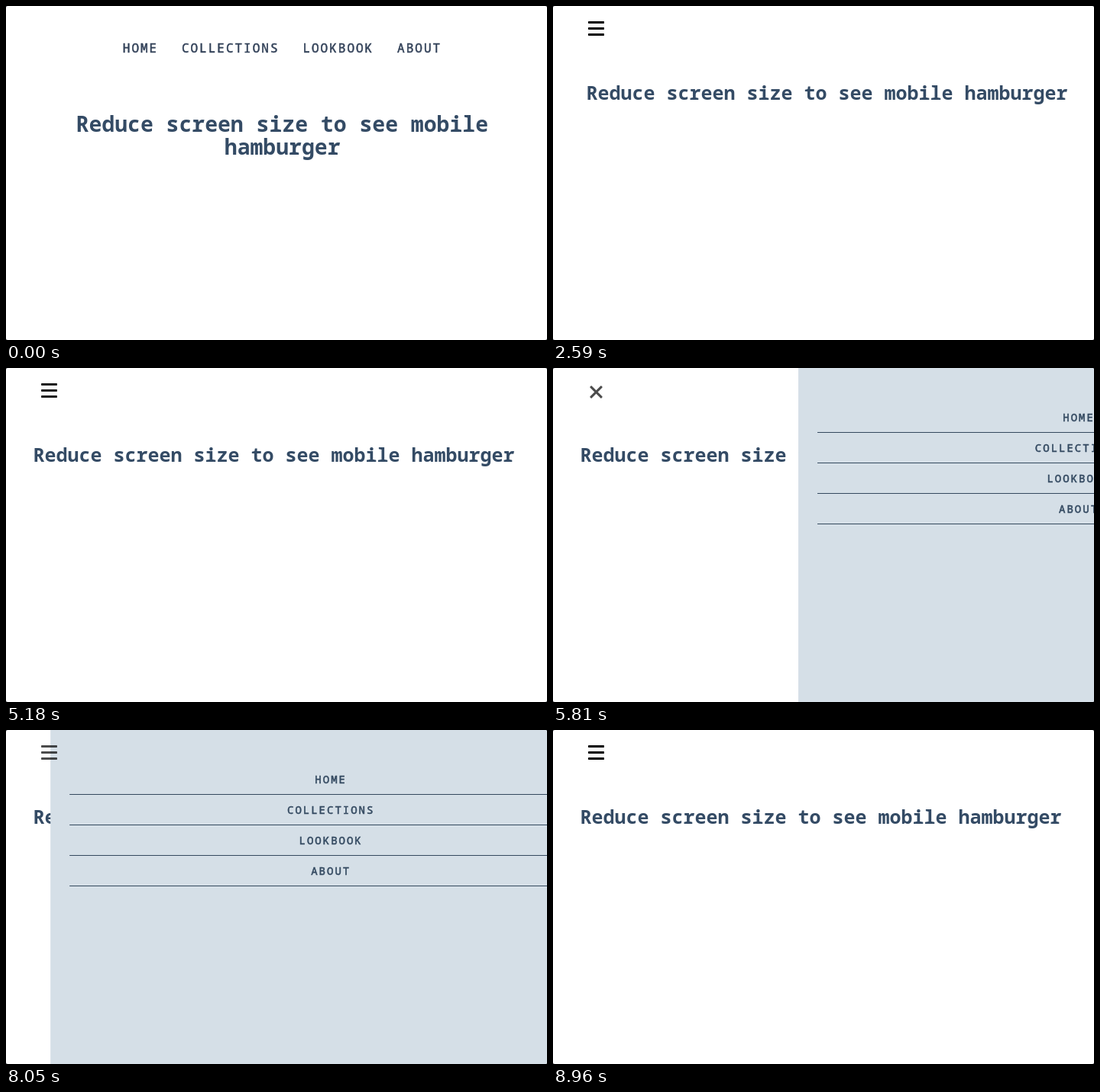
These frames come from a looping animation (708 px wide and 438 px high, 9870 ms). An HTML page:

```html
<!DOCTYPE html>
<html lang="en">
<head>
<meta charset="utf-8">
<title>Mobile menu</title>
<style>
  html, body { margin: 0; width: 100%; height: 100%; overflow: hidden; background: #4a4f55; }
  svg { display: block; width: 708px; height: 438px; background: #fff; border-radius: 2.5px; }
  text { font-family: 'Roboto Mono', 'Noto Sans Mono', monospace; fill: #344b65; white-space: pre; }
  .title { font-weight: 700; }
  .wide .title { font-size: 28.1px; }
  #narrow { font-size: 25px; }
  /* The thin stroke gives a medium weight */
  .link { font-weight: 500; letter-spacing: 2px; stroke: #34495e; stroke-width: .55px; }
  .wide .link { font-size: 16px; fill: #34435a; stroke: #34435a; }
  #panel .link { font-size: 14px; }
  #panel path { stroke: #34495e; stroke-width: 1; }
</style>
</head>
<body>
<svg viewBox="0 0 708 438">
  <g id="wide" class="wide">
    <text class="title" x="91.6" y="165">Reduce screen size to see mobile</text>
    <text class="title" x="285.8" y="195">hamburger</text>
  </g>
  <text id="narrow" class="title" y="123">Reduce screen size to see mobile hamburger</text>
  <g id="panel"><rect width="760" height="438" fill="#d5dfe7"/></g>
  <g id="icon">
    <rect x="-10.5" y="-1.5" width="21" height="3" rx=".8"/>
    <rect x="-10.5" y="-1.5" width="21" height="3" rx=".8"/>
    <rect x="-10.5" y="-1.5" width="21" height="3" rx=".8"/>
  </g>
</svg>
<script>
const LOOP = 9870, STEP = 70, LAST = 8960;
const NARROW_AT = 2590;
const links = ['HOME', 'COLLECTIONS', 'LOOKBOOK', 'ABOUT'];
const wideX = [152.8, 229.9, 388.4, 512.1];
// Resize bursts: [first step, number of steps]
const nudges = [[2660, 4], [3010, 5], [3640, 3], [4130, 2]];

const $ = id => document.getElementById(id);
const wide = $('wide'), narrow = $('narrow'), panel = $('panel'), icon = $('icon');
const [upper, middle, lower] = icon.children;

function add(parent, tag, attrs, text = '') {
  const el = document.createElementNS('http://www.w3.org/2000/svg', tag);
  for (const name in attrs) el.setAttribute(name, attrs[name]);
  el.textContent = text;
  parent.append(el);
}

links.forEach((label, i) => {
  const y = 70 + 40 * i;
  add(wide, 'text', { class: 'link', x: wideX[i], y: 61 }, label);
  add(panel, 'text', { class: 'link', x: 367 - label.length * 5.2, y }, label);
  add(panel, 'path', { d: `M25 ${y + 14.5}H708` });
});

const ramp = (t, start, length) => Math.min(1, Math.max(0, (t - start) / length));

// cubic-bezier(.42, 0, .58, 1), solved by bisection
function easeInOut(x) {
  let lo = 0, hi = 1;
  for (let i = 0; i < 24; i++) {
    const s = (lo + hi) / 2, r = 1 - s;
    if (1.26 * s * r * r + 1.74 * s * s * r + s ** 3 < x) lo = s; else hi = s;
  }
  return lo * lo * (3 - 2 * lo);
}

function titleX(t) {
  const moved = nudges.reduce((sum, [start, count]) =>
    sum + Math.min(count, Math.max(0, Math.floor((t - start) / STEP) + 1)), 0);
  return 43.4 - moved * 8 / 14;
}

const place = (el, y, angle) =>
  el.setAttribute('transform', `translate(56.5 ${y}) rotate(${angle})`);

function draw(t) {
  const small = t >= NARROW_AT;
  wide.style.display = small ? 'none' : '';
  narrow.style.display = icon.style.display = small ? '' : 'none';
  narrow.setAttribute('x', titleX(t));

  const open = easeInOut(ramp(t, 5498, 600)) - easeInOut(ramp(t, 7916, 600));
  panel.style.display = open > 0 ? '' : 'none';
  panel.setAttribute('transform', `translate(${708 - 724 * open} 0)`);

  const cross = ramp(t, 5495, 210) - ramp(t, 7735, 210);
  place(upper, 21.5 + 10 * cross, -45 * cross);
  place(middle, 29.5, 0);
  place(lower, 37.5 - 6 * cross, 45 * cross);
  middle.setAttribute('opacity', 1 - cross);

  const hover = ramp(t, 5110, 210) - ramp(t, 8610, 210);
  icon.setAttribute('opacity', 1 - 0.3 * hover);
}

const begin = performance.now();
function tick() {
  const t = (performance.now() - begin) % LOOP;
  draw(Math.min(LAST, Math.floor(t / STEP) * STEP));
  requestAnimationFrame(tick);
}
tick();
</script>
</body>
</html>
```
